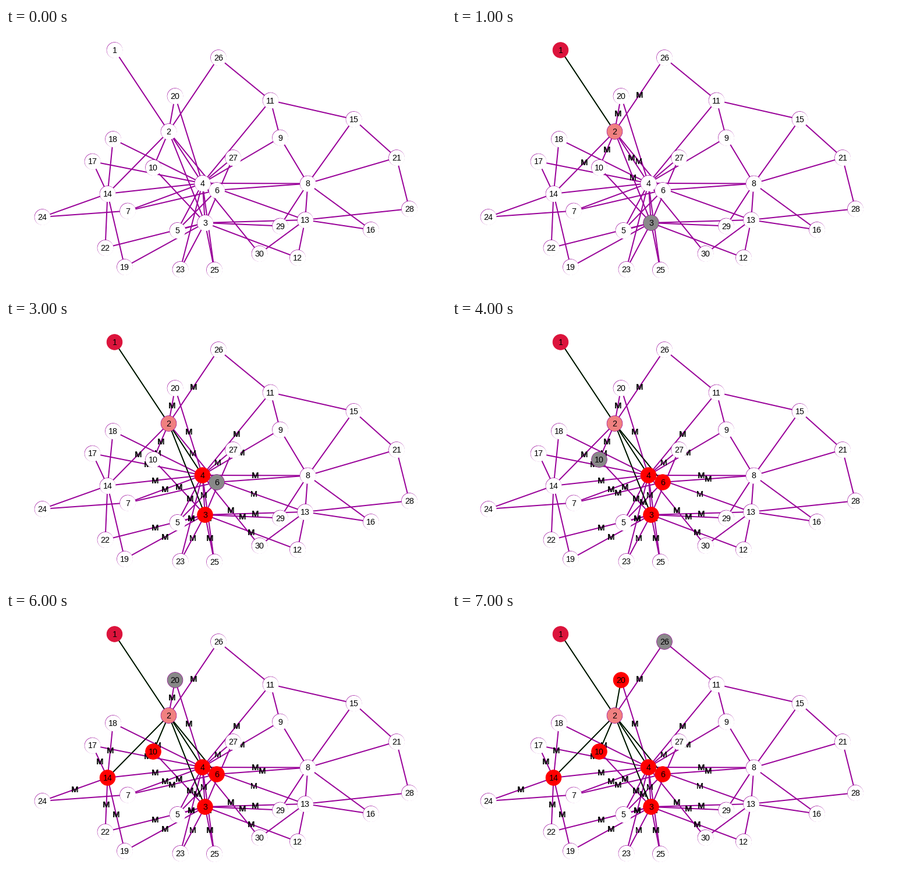
A matplotlib script that plays this animation: 756x454 px, repeating every 8 s.

```python
import matplotlib.pyplot as plt
from matplotlib.animation import FuncAnimation
from matplotlib.patches import Circle

W, H, DPI = 756, 454, 100
PX = 72 / DPI
RADIUS = 13.3
PURPLE = "#990099"
WHITE, GRAY, RED = "#ffffff", "#888888", "#ff0000"
CRIMSON, CORAL = "#dc143c", "#f08080"

NODES = dict(enumerate([
    (186.5, 38), (279.5, 178), (342, 335), (337.5, 267), (294.5, 348),
    (362, 279), (209, 314.5), (518.5, 267.5), (471, 188.5), (253, 240),
    (454.5, 124.5), (501, 395), (514, 330), (174.5, 285), (597.5, 157),
    (627, 347), (148.5, 229.5), (184, 191), (204, 411), (290.5, 117),
    (671, 223), (170.5, 378), (299.5, 415), (62.5, 325), (358, 416),
    (365, 51), (390, 223), (693, 311), (471, 340.5), (435.5, 388)], 1))

LINKS = {
    1: [2],
    2: [3, 4, 6, 10, 14, 20, 26],
    3: [4, 5, 10, 12, 13, 19, 22, 23, 25, 27, 29],
    4: [5, 7, 8, 9, 11, 13, 14, 17, 18, 20, 23, 25, 27, 30],
    6: [5, 7, 8],
    7: [24],
    8: [9, 13, 15, 16, 21, 29],
    11: [9, 15, 26],
    13: [12, 16, 28, 30],
    14: [17, 18, 19, 22, 24],
    15: [21],
    21: [28],
}
EDGES = [(a, b) for a, ends in LINKS.items() for b in ends]
ORDER = LINKS[2]  # order in which node 2 reaches its neighbours

fig = plt.figure(figsize=(W / DPI, H / DPI), dpi=DPI, facecolor="white")
ax = fig.add_axes([0, 0, 1, 1])
ax.set_xlim(0, W)
ax.set_ylim(H, 0)
ax.axis("off")


def label(x, y, text, z):
    return ax.text(x, y + 5, text, family="Liberation Sans", size=14.2 * PX,
                   ha="center", va="baseline", color="black", zorder=z)


lines, cores, marks = {}, {}, {}
for a, b in EDGES:
    (xa, ya), (xb, yb) = NODES[a], NODES[b]
    lines[a, b], = ax.plot([xa, xb], [ya, yb], lw=2 * PX, zorder=1)
    cores[a, b], = ax.plot([xa, xb], [ya, yb], lw=1.2 * PX,
                           color="black", zorder=2)
    mx, my = (xa + xb) / 2, (ya + yb) / 2
    marks[a, b] = [label(mx + dx, my, "M", 3) for dx in (-0.4, 0.4)]

faces, rings = {}, {}
for n, (x, y) in NODES.items():
    rings[n] = ax.add_patch(Circle((x, y), RADIUS, lw=0.9 * PX, zorder=4))
    faces[n] = ax.add_patch(Circle((x, y), RADIUS, lw=0, zorder=5))
    label(x, y, str(n), 6)


def paint(n, color):
    x, y = NODES[n]
    blank = color == WHITE
    # a shifted blank face leaves only the upper left of the ring visible
    faces[n].center = (x + 0.4, y + 0.5) if blank else (x, y)
    faces[n].set_radius(RADIUS + 0.3 if blank else RADIUS - 0.3)
    faces[n].set_facecolor(color)
    rings[n].set_facecolor(color)
    rings[n].set_edgecolor(color if color in (RED, CRIMSON) else PURPLE)


def draw(step):
    reached = ORDER[:max(step - 1, 0)]
    colors = dict.fromkeys(NODES, WHITE)
    if step:
        colors.update({1: CRIMSON, 2: CORAL, ORDER[step - 1]: GRAY})
        colors.update(dict.fromkeys(reached, RED))
    for n, color in colors.items():
        paint(n, color)

    senders = {2, *reached} if step else set()
    for a, b in EDGES:
        tree = (a, b) == (1, 2) and step > 0 or a == 2 and b in reached
        lines[a, b].set_color("#004000" if tree else PURPLE)
        cores[a, b].set_visible(tree)
        sent = bool(senders & {a, b}) and not tree
        for mark in marks[a, b]:
            mark.set_visible(sent)
    return []


anim = FuncAnimation(fig, draw, frames=8, interval=1000, repeat=True,
                     repeat_delay=0, blit=False)
plt.show()
```
